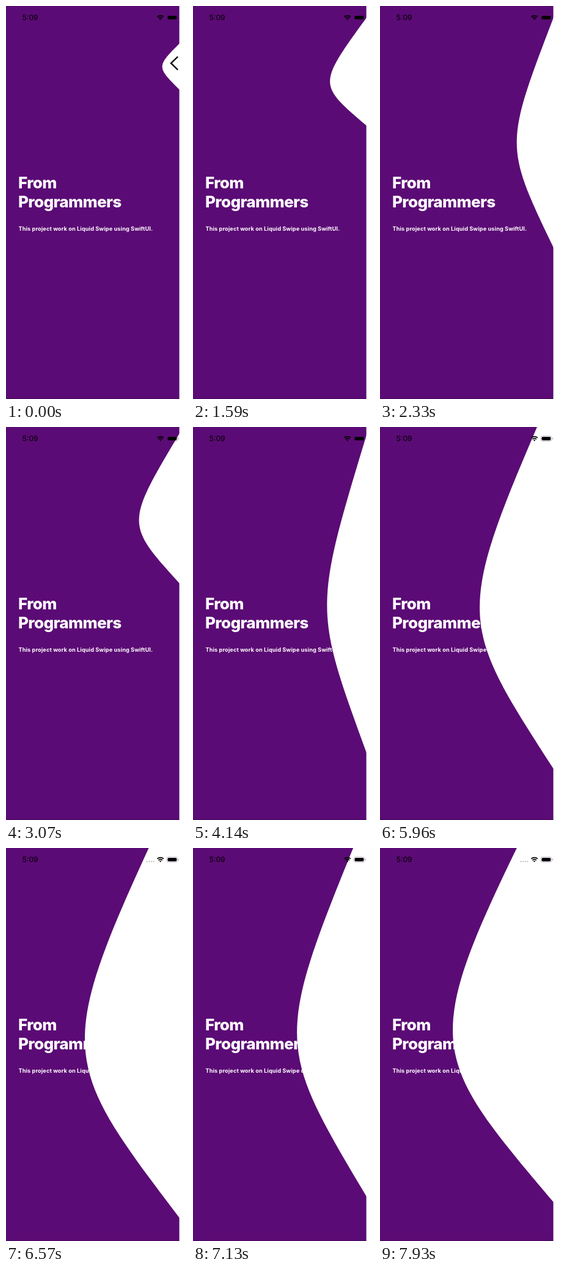
An HTML page that plays this animation: 296 by 640 pixels, repeating every 8000 ms.

```html
<!DOCTYPE html>
<html lang="en">
<head>
<meta charset="utf-8">
<title>Liquid swipe</title>
<style>
  html, body { margin: 0; width: 100%; height: 100%; overflow: hidden; background: #fff; }
  svg { display: block; width: 296px; height: 640px; }
  text { font-family: Inter, "Liberation Sans", sans-serif; fill: #fff; }
  .title { font-size: 26px; font-weight: 800; letter-spacing: -0.6px; }
  .note { font-size: 9.1px; font-weight: 700; letter-spacing: 0.13px; }
  .clock { font-size: 12px; font-weight: 500; fill: #0c0210; }
  .line { fill: none; stroke: #000; }
</style>
</head>
<body>
<svg viewBox="0 0 296 640">
  <defs><clipPath id="drop"><path class="wave"/></clipPath></defs>
  <rect width="284" height="640" fill="#5b0b75"/>
  <rect y="638" width="284" height="2" fill="#510a68"/>
  <rect x="283" width="1" height="640" fill="#b090bd"/>
  <text class="title" x="20" y="297">From</text>
  <text class="title" x="20" y="328">Programmers</text>
  <text class="note" x="20.5" y="366">This project work on Liquid Swipe using SwiftUI.</text>
  <path class="wave" fill="#fff"/>
  <path id="chevron" class="line" stroke-width="2.4" d="M281 82.5 L269.9 93.2 L281 104"/>

  <text class="clock" x="26.5" y="23">5:09</text>
  <g clip-path="url(#drop)">
    <path d="M230.5 22h12" stroke="#c8c8c8" stroke-width="2.4" stroke-linecap="round" stroke-dasharray="0 3.6"/>
    <rect x="262.8" y="14.6" width="18" height="8.6" rx="3" fill="none" stroke="#c5b4ca"/>
    <path d="M282.4 17.6v2.6" stroke="#c5b4ca" stroke-width="1.2"/>
  </g>
  <rect x="264.3" y="16" width="15" height="5.8" rx="2"/>
  <path class="line" stroke-width="1.7" d="M247.3 17.7a7.4 7.4 0 0 1 10.4 0M249.3 19.9a4.5 4.5 0 0 1 6.4 0"/>
  <path d="M252.5 23.2l-1.6-1.7a2.3 2.3 0 0 1 3.2 0z"/>
</svg>
<script>
const LOOP = 8000, STEP = 115;
const EDGE = 284, UNIT = 296 / 390;
const TOP = 80 * UNIT, BOTTOM = 180 * UNIT, BULGE = 50 * UNIT;

// Turning points of the finger: time, pull to the left, lower end of the wave
const drag = [
  [1040, 0, BOTTOM], [1320, 39, 176], [1590, 42, 195], [2930, 43, 593],
  [3070, 50.7, 255], [3770, 54, 490], [4400, 40, 593], [4720, 32, 567],
  [5080, 49, 540], [5410, 56, 625], [5610, 87, 625], [5960, 123.3, 557],
  [6795, 187, 621], [7130, 114, 568], [7300, 114, 568], [7600, 239, 640],
  [7930, 182, 577]
];

const waves = document.querySelectorAll(".wave");
const chevron = document.getElementById("chevron");

// Moves between turning points in equal screen refreshes
function dragAt(t) {
  const i = drag.findLastIndex(k => k[0] <= t);
  const a = drag[Math.max(i, 0)], b = drag[i + 1];
  if (i < 0 || !b) return a.slice(1);
  const span = b[0] - a[0], n = Math.round(span / STEP);
  const f = Math.floor((t - a[0]) / span * n) / n;
  return [1, 2].map(j => a[j] + (b[j] - a[j]) * f);
}

function draw(t) {
  const [pull, end] = dragAt(t);
  const x = EDGE - BULGE - pull, mid = (TOP + end) / 2;
  const d = `M${EDGE} ${TOP - pull}C${x} ${mid} ${x} ${mid} ${EDGE} ${end}Z`;
  waves.forEach(w => w.setAttribute("d", d));
  chevron.setAttribute("opacity", Math.max(0, 1 - pull / 25));
}

const start = performance.now();
function loop() {
  draw((performance.now() - start) % LOOP);
  requestAnimationFrame(loop);
}
loop();
</script>
</body>
</html>
```
